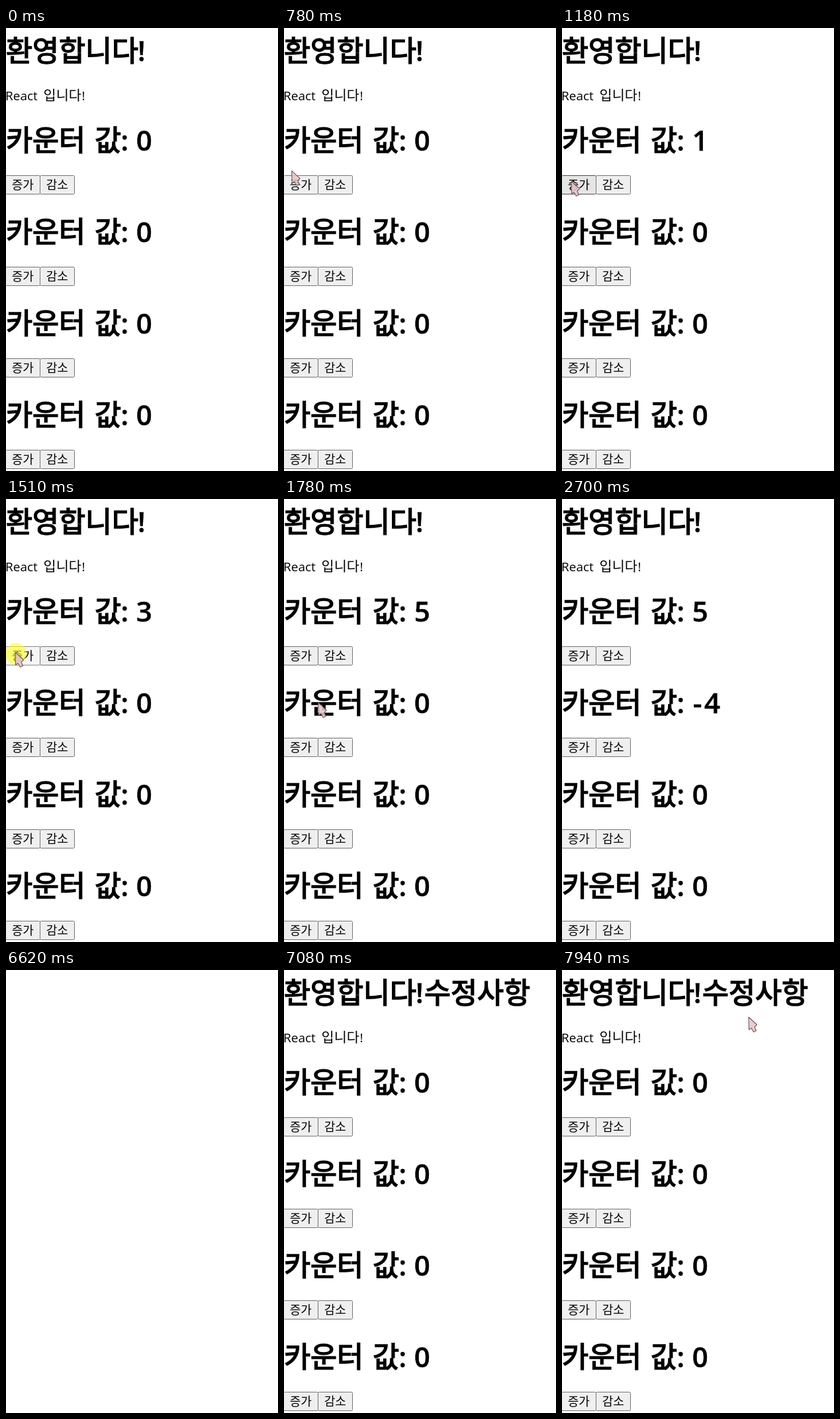
Write an HTML page that moves like this. It is 411 by 668 pixels and loops after 8000 ms.

```html
<!DOCTYPE html>
<html lang="ko">
<head>
<meta charset="utf-8">
<title>카운터</title>
<style>
  html, body { margin: 0; width: 100%; height: 100%; overflow: hidden; background: #fff; }
  svg { display: block; width: 411px; height: 668px; }
  text { font-family: "Noto Sans CJK KR", "Noto Sans KR", sans-serif; font-weight: 350; }
  .lat { font-family: "Open Sans", "Noto Sans", sans-serif; font-weight: 400; }
  .h { font-size: 43.5px; font-weight: 400; stroke: #000; stroke-width: 1.6; }
  .h.lat { font-size: 42px; font-weight: 600; stroke-width: .5; }
  .p { font-size: 20.8px; }
  .p.lat { font-size: 19px; }
  .b { font-size: 18px; }
  .btn { fill: #efefef; stroke: #767676; }
  .btn.hover { fill: #e5e5e5; stroke: #4f4f4f; }
  .btn.down { fill: #f5f5f5; stroke: #8d8d8d; }
  #arrow { fill: #e6c6c8; fill-opacity: .88; stroke: #74595b; stroke-width: 1.1; stroke-linejoin: round; }
</style>
</head>
<body>
<svg viewBox="0 0 411 668">
  <g id="page">
    <text class="h" x="0" y="50">환영합니다</text>
    <text class="h lat" x="199" y="50">!</text>
    <text class="h" id="edit" x="212" y="50">수정사항</text>
    <text class="p lat" x="-1" y="109">React</text>
    <text class="p" x="56.5" y="109">입니다</text>
    <text class="p lat" x="114.5" y="109">!</text>
    <g id="rows"></g>
  </g>
  <g id="cursor">
    <circle id="glow" cx="1" cy="2.3" r="16" fill="#ffff20" fill-opacity=".6"/>
    <path id="arrow" d="M0 0L.5 19L4 16.5L7.5 22.5L11.5 20.5L9 15L12.5 11.5Z"/>
  </g>
</svg>
<script>
const LOOP = 8000, START = 120, STEP = 66.15, ROW = 138;
const BLANK = 6620, RELOAD = 7080, HIDE = 39;
const $ = id => document.getElementById(id);
const all = name => document.querySelectorAll(name);
const show = (el, on) => { el.style.display = on ? '' : 'none'; };

const button = (x, label) =>
  `<rect class="btn" x="${x}" y="222.5" width="52" height="28" rx="1.8"/>
   <text class="b" x="${x + 9.2}" y="243.3">${label}</text>`;

$('rows').innerHTML = [0, 1, 2, 3].map(i =>
  `<g transform="translate(0 ${i * ROW})">
    <text class="h" x="0" y="185">카운터</text>
    <text class="h" x="134" y="185">값</text>
    <text class="h lat" x="173.5" y="185">:</text>
    <text class="h lat sign" x="198" y="185">-</text>
    <text class="h lat num" y="185">0</text>
    ${button(-.5, '증가')}${button(51.5, '감소')}
  </g>`).join('');

const nums = all('.num'), signs = all('.sign'), btns = all('.btn');

// Pointer moves along Bezier curves; times count pointer samples
const moves = [
  { from: 0, to: 12, ease: 2.2, pts: [[337, 587], [130, 250], [-30, -50], [14, 231]] },
  { from: 24, to: 27, ease: 2, pts: [[14, 231], [82, 368]] },
  { from: 31, to: 37, ease: 1, pts: [[82, 368], [72, 384]] },
  { from: 37, to: 39, ease: 1, pts: [[72, 384], [50, 332]] },
  { from: 115, to: 118, ease: 1.5, pts: [[197, 132], [282, 71]] }
];

function bezier(pts, u) {
  if (pts.length === 1) return pts[0];
  const next = pts.slice(1).map(([x, y], i) =>
    [pts[i][0] + (x - pts[i][0]) * u, pts[i][1] + (y - pts[i][1]) * u]);
  return bezier(next, u);
}

function pointer(n) {
  const m = moves.filter(m => m.from <= n).pop();
  const u = Math.min(1, (n - m.from) / (m.to - m.from));
  return bezier(m.pts, 1 - (1 - u) ** m.ease);
}

// A click takes two samples: pressed on the odd one, counted on the even one
function clicks(n, first, total) {
  const k = Math.max(0, Math.min(n - first, total * 2));
  return { count: Math.floor(k / 2), down: k % 2 === 1 };
}

function setCount(i, value) {
  nums[i].textContent = Math.abs(value);
  nums[i].setAttribute('x', value < 0 ? 215 : 196.8);
  show(signs[i], value < 0);
}

function setButton(el, pos, down) {
  const box = el.getBBox();
  const over = pos && pos[0] > box.x && pos[0] < box.x + box.width &&
    pos[1] > box.y && pos[1] < box.y + box.height;
  el.setAttribute('class', 'btn' + (down ? ' down' : over ? ' hover' : ''));
}

function draw(now) {
  const n = Math.floor((now - START) / STEP + .05);
  const fresh = now >= RELOAD;
  const pos = n >= 0 && n < HIDE || n >= 115 ? pointer(n) : null;
  const plus = clicks(n, 14, 5), minus = clicks(n, 29, 4);

  show($('page'), now < BLANK || fresh);
  show($('edit'), fresh);
  setCount(0, fresh ? 0 : plus.count);
  setCount(1, fresh ? 0 : -minus.count);
  [2, 3].forEach(i => setCount(i, 0));

  setButton(btns[0], pos, plus.down);
  setButton(btns[3], pos && [pos[0], pos[1] - ROW], minus.down);

  show($('cursor'), pos);
  show($('glow'), plus.down || minus.down);
  if (pos) $('cursor').setAttribute('transform', `translate(${pos})`);
}

const begin = performance.now();
function tick() {
  draw((performance.now() - begin) % LOOP);
  requestAnimationFrame(tick);
}
tick();
</script>
</body>
</html>
```
